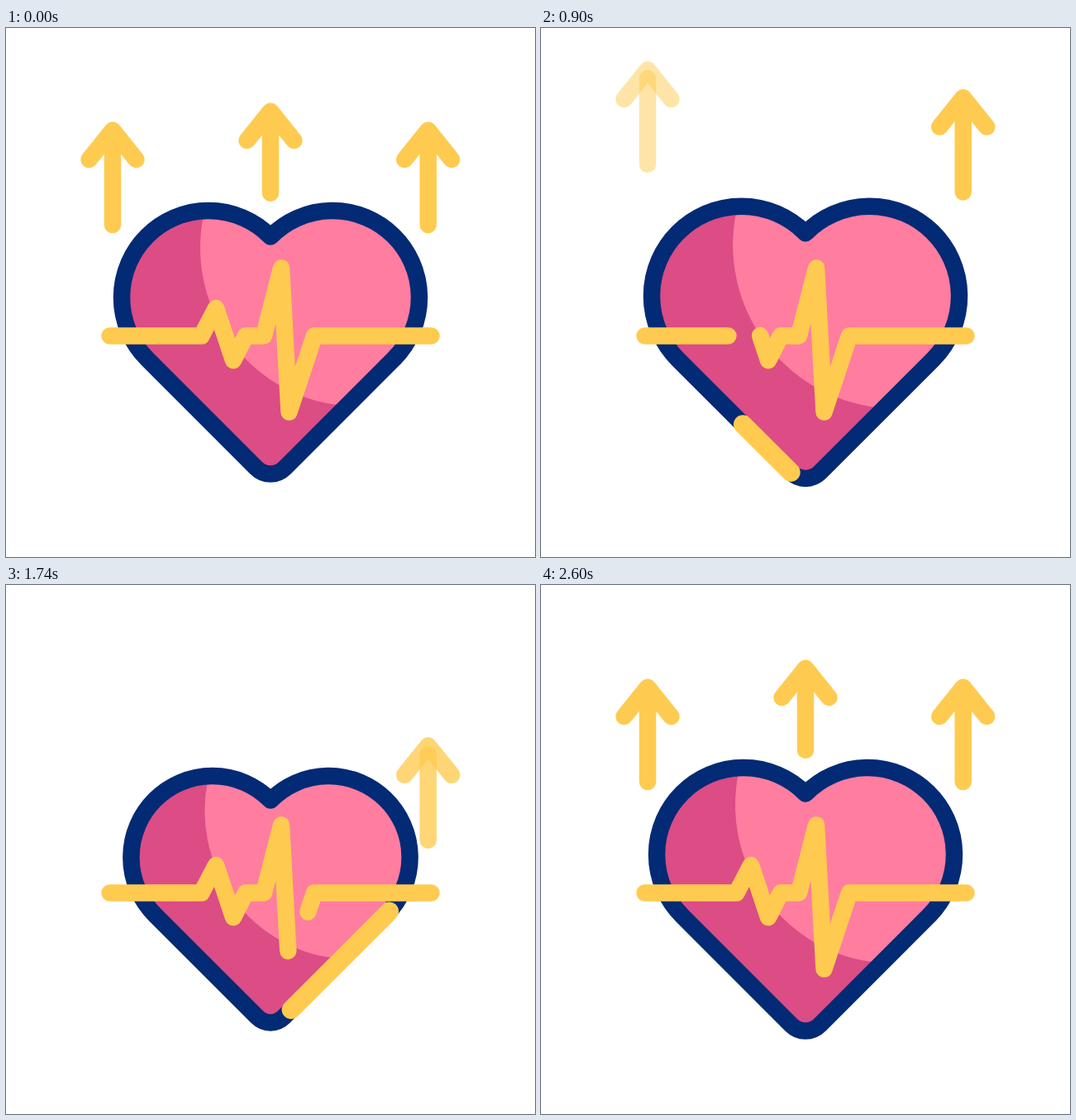
Animation, 640 px wide and 640 px high, one loop 3 s. Source, as an HTML page with a canvas:

```html
<!DOCTYPE html>
<html lang="en">
<head>
<meta charset="utf-8">
<title>Heartbeat</title>
<style>
  html, body { margin: 0; width: 100%; height: 100%; overflow: hidden; background: #fff; }
  canvas { display: block; width: 100vw; height: 100vh; }
</style>
</head>
<body>
<canvas id="stage" width="640" height="640"></canvas>
<script>
const ctx = document.getElementById('stage').getContext('2d');
const LOOP = 3000, STEP = 20;
const GOLD = '#fecb50', NAVY = '#032a75', PINK = '#ff7d9f', ROSE = '#dc4c85';
const LINE = 20.5;

// Eased progress of t from start to end, clamped to 0..1
function ease(t, start, end) {
  const u = Math.min(1, Math.max(0, (t - start) / (end - start)));
  return u * u * (3 - 2 * u);
}

// Heart outline: two lobes and a rounded tip, running clockwise from the tip's left side
const LOBE = { r: 105, y: 326, dx: 75 };
const TIP = { r: 24.1, y: 515.4 };
const dip = Math.acos(LOBE.dx / LOBE.r);
const heart = new Path2D();
heart.moveTo(320 - TIP.r * Math.SQRT1_2, TIP.y + TIP.r * Math.SQRT1_2);
heart.arc(320 - LOBE.dx, LOBE.y, LOBE.r, Math.PI * 0.75, Math.PI * 2 - dip);
heart.arc(320 + LOBE.dx, LOBE.y, LOBE.r, Math.PI + dip, Math.PI * 2.25);
heart.arc(320, TIP.y, TIP.r, Math.PI * 0.25, Math.PI * 0.75);
heart.closePath();
const sideLength = Math.hypot(320 - LOBE.dx - 320, TIP.y - LOBE.y);
const heartLength = 2 * LOBE.r * (Math.PI * 1.25 - dip)
  + 2 * Math.sqrt(sideLength ** 2 - (LOBE.r - TIP.r) ** 2) + TIP.r * Math.PI / 2;

const pulsePoints = [
  [125.5, 372.5], [236.5, 372.5], [254, 339], [275, 402], [290, 372.5],
  [312, 372.5], [333, 290.5], [342.5, 464.5], [373, 372.5], [514.5, 372.5]
];
const pulse = new Path2D();
let pulseLength = 0;
pulsePoints.forEach(([x, y], i) => {
  pulse.lineTo(x, y);
  if (i) pulseLength += Math.hypot(x - pulsePoints[i - 1][0], y - pulsePoints[i - 1][1]);
});

const arrows = [
  { x: 320, y: 100.7, shaft: 99, leave: 200, enter: 1800, depth: 68.5 },
  { x: 129, y: 123.7, shaft: 114.3, leave: 400, enter: 2000, depth: 82 },
  { x: 510.7, y: 123.7, shaft: 114.3, leave: 600, enter: 1600, depth: 82 }
];

// Stroke the part of a path between two fractions of its length
function strokePart(path, length, from, to) {
  if (to <= from) return;
  ctx.setLineDash([(to - from) * length, 1e4]);
  ctx.lineDashOffset = -from * length;
  ctx.stroke(path);
  ctx.setLineDash([]);
}

function drawArrow({ x, y, shaft, leave, enter, depth }, t) {
  const RISE = 600, FADE = 200;
  const returning = t >= enter;
  const shift = returning
    ? depth * (1 - ease(t, enter, enter + RISE))
    : -79 * ease(t, leave, leave + RISE);
  const alpha = returning
    ? ease(t, enter, enter + FADE)
    : 1 - ease(t, leave + RISE - FADE, leave + RISE);
  if (alpha <= 0) return;
  const top = y + shift;
  ctx.globalAlpha = alpha;
  ctx.strokeStyle = GOLD;
  ctx.lineWidth = LINE;
  ctx.beginPath();
  ctx.moveTo(x, top + 10.5);
  ctx.lineTo(x, top + shaft);
  ctx.stroke();
  ctx.beginPath();
  ctx.moveTo(x - 28.5, top + 35.4);
  ctx.lineTo(x, top);
  ctx.lineTo(x + 28.5, top + 35.4);
  ctx.stroke();
  ctx.globalAlpha = 1;
}

// Beats every 600 ms between 0.93 and 1.07, starting and ending at rest
function heartScale(t) {
  const BEAT = 300, SWING = 0.07, START = 200, COUNT = 8;
  const i = Math.floor((t - START) / BEAT);
  if (i < 0 || i >= COUNT) return 1;
  const level = k => k === 0 || k === COUNT ? 1 : 1 + (k % 2 ? -SWING : SWING);
  const begin = START + i * BEAT;
  return level(i) + (level(i + 1) - level(i)) * ease(t, begin, begin + BEAT);
}

function drawHeart(t) {
  const scale = heartScale(t);
  ctx.save();
  ctx.translate(320, 380);
  ctx.scale(scale, scale);
  ctx.translate(-320, -380);

  ctx.save();
  ctx.clip(heart);
  ctx.fillStyle = ROSE;
  ctx.fillRect(100, 180, 440, 400);
  ctx.fillStyle = PINK;
  ctx.beginPath();
  ctx.arc(427, 266, 192, 0, Math.PI * 2);
  ctx.fill();
  ctx.restore();

  ctx.strokeStyle = NAVY;
  ctx.lineWidth = LINE / scale;
  ctx.stroke(heart);
  ctx.strokeStyle = GOLD;
  ctx.lineWidth = 22.6 / scale;
  strokePart(heart, heartLength, ease(t, 900, 2100), ease(t, 700, 1900));
  ctx.restore();
}

function drawPulse(t) {
  ctx.strokeStyle = GOLD;
  ctx.lineWidth = LINE;
  strokePart(pulse, pulseLength, 0, ease(t, 400, 2600));
  strokePart(pulse, pulseLength, ease(t, 200, 2400), 1);
}

function draw(now) {
  const t = Math.floor((now % LOOP) / STEP) * STEP;
  ctx.fillStyle = '#fff';
  ctx.fillRect(0, 0, 640, 640);
  ctx.lineCap = ctx.lineJoin = 'round';
  arrows.forEach(arrow => drawArrow(arrow, t));
  drawHeart(t);
  drawPulse(t);
}

let origin;
function tick(now) {
  origin ??= now;
  draw(now - origin);
  requestAnimationFrame(tick);
}
draw(0);
requestAnimationFrame(tick);
</script>
</body>
</html>
```
